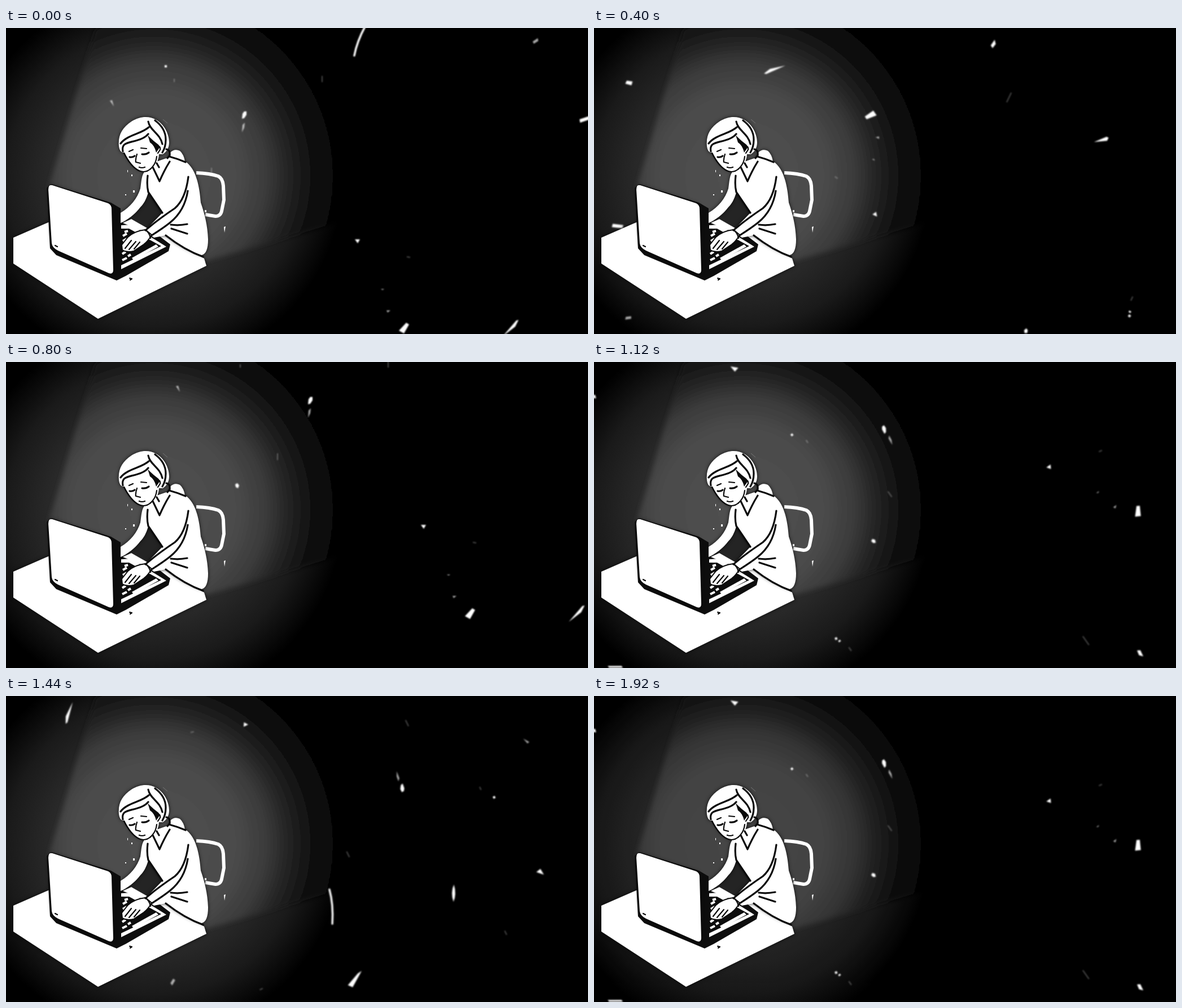
Animation, 1031 px wide and 543 px high, one loop 2000 ms. Source, as an HTML page:

```html
<!DOCTYPE html>
<html lang="en">
<head>
<meta charset="utf-8">
<title>Late at the laptop</title>
<style>
  html, body { margin: 0; width: 100%; height: 100%; overflow: hidden; background: #000; }
  svg { display: block; width: 100%; height: 100%; }
  .shadow { filter: drop-shadow(0 0 3px #000c); }
  .ink { fill: none; stroke: #0a0a0a; stroke-width: 3.2; stroke-linecap: round; stroke-linejoin: round; }
  .thin { stroke-width: 2.2; }
</style>
</head>
<body>
<svg viewBox="0 0 1031 543" preserveAspectRatio="none">
  <defs>
    <radialGradient id="dim" gradientUnits="userSpaceOnUse" cx="262" cy="268" r="335">
      <stop offset="0" stop-color="#323232"/>
      <stop offset=".55" stop-color="#292929"/>
      <stop offset=".78" stop-color="#1a1a1a"/>
      <stop offset="1" stop-color="#000"/>
    </radialGradient>
    <radialGradient id="lit" gradientUnits="userSpaceOnUse" cx="262" cy="262" r="342">
      <stop offset="0" stop-color="#505050"/>
      <stop offset=".42" stop-color="#4b4b4b"/>
      <stop offset=".58" stop-color="#3b3b3b"/>
      <stop offset=".7" stop-color="#232323"/>
      <stop offset=".82" stop-color="#101010"/>
      <stop offset="1" stop-color="#000"/>
    </radialGradient>
    <filter id="soft"><feGaussianBlur stdDeviation="4"/></filter>
    <filter id="grainy"><feGaussianBlur stdDeviation=".8"/></filter>
  </defs>

  <rect width="1031" height="543"/>
  <g id="glow">
    <rect width="620" height="543" fill="url(#dim)"/>
    <path d="M162-10L75 285 200 440 345 416 612 338V-10z" fill="url(#lit)" filter="url(#soft)"/>
  </g>

  <g id="dust" fill="#fff" filter="url(#grainy)">
    <!-- bright flakes -->
    <path d="M418 161l1-9 3-4 4 0 0 6-4 6zM714 526L705 542 696 537 709 523zM880 547L904 519l4-1-6 12z
      M618 375l9 0-4 7zM1016 162l18-6 1 6-18 6zM281 66h4v4h-4zM289 303l4-2 3 4-2 5-4-2z
      M1111 398l11-2 0 6-10 3zM562 733l5 3-2 12-5-6zM328 660l-16 18-4 0 0-6z
      M137 406l4 1-1 4-4-1zM139 414l4 0 0 3-4 0zM264-94l10 10-9 2zM34-194l5 3-2 6-4-3z
      M-220 215l20 14 0 4-20-14zM415-40Q418-58 429-67 427-50 415-40zM662-118L637-107l-8 1 27-19z"/>
    <path d="M617 49Q622 22 639-8" fill="none" stroke="#fff" stroke-width="3.5" stroke-linecap="round"/>
    <!-- mid-tone flakes -->
    <path opacity=".65" d="M418 185l1-13 4-4-1 9zM674 501l7 0-5 4zM664 463l6 0-3 2z
      M933 24l9-6 1 5-8 5zM184 129l4-1 3 11z"/>
    <!-- barely visible threads -->
    <path opacity=".28" fill="none" stroke="#fff" stroke-width="2"
      d="M298 90v6M560 85v11M710 406l6 1M364 248v12M498 657v19M148 434v8M370-161v8M800-57h6"/>
  </g>

  <!-- chair and desk -->
  <path d="M337 257Q362 258 376 263 384 267 385 280L386 305 382 325Q380 334 371 334L353 331"
    fill="none" stroke="#fff" stroke-width="6"/>
  <path class="shadow" fill="#fff" d="M13 372L70 347 110 330 205 345 285 369 351 409 355 422 163 516 13 418z"/>
  <path fill="#fff" d="M386 353l3-1-2 11z"/>

  <!-- laptop body and keyboard -->
  <path fill="#0d0d0d" d="M72 284L78 391 89 403 196 448 212 440 288 396 291 384 240 345H203V320L186 310 80 277z"/>
  <path fill="#fff" d="M204 350L222 349 284 388 204 428z"/>
  <path fill="#0d0d0d" d="M204 356L218 356 275 387 204 421z"/>
  <path fill="#fff" d="M223 408L266 384 270 388 226 412z"/>
  <path d="M207 369l7-4M207 378l7-4M206 401l6-4M206 412l8-4M216 405l5-3M210 362l6-2"
    stroke="#fff" stroke-width="4"/>
  <path class="shadow" fill="#fff"
    d="M82 279L181 311Q187 314 187 321L190 429Q190 438 182 435L92 395Q82 390 81 382L75 287Q75 277 82 279z"/>
  <path d="M87 386l4 2M219 444l4 1-3 2" class="ink thin"/>

  <!-- figure -->
  <path fill="#242424" d="M252 288L280 328 248 356 212 342z"/>
  <g class="shadow" fill="#fff">
    <path d="M290 222Q298 213 308 218 315 224 317 237L288 233z"/>
    <path d="M264 238L290 229 318 237C337 250 343 282 345 310 352 330 357 350 358 375 358 392 354 402 346 403
      325 395 305 385 283 368L262 372 246 360 277 328 252 292C248 305 244 312 238 318 228 331 215 341 203 346
      L203 328C220 318 233 302 238 285 240 270 240 262 246 254z"/>
    <path d="M200 210C198 190 206 177 222 166 238 156 254 156 266 163 281 171 289 189 289 203 289 213 284 220 278 224
      L271 224C270 240 260 254 246 255 232 254 220 241 210 221 204 222 201 217 200 210z"/>
  </g>
  <path fill="#fff" d="M207 346L222 339 250 355 244 361z"/>
  <path fill="#fff" stroke="#0a0a0a" stroke-width="2"
    d="M247 358L258 367Q252 378 244 384L226 396Q214 399 206 394L205 385 216 371Q228 360 247 358z"/>
  <path class="ink thin" d="M211 391l11-14M218 393l12-14M227 392l10-12M246 358Q254 362 256 373"/>

  <!-- hair and face -->
  <path class="ink" d="M203 205C214 190 240 188 253 176M252 166C255 182 273 187 277 206
    M207 219C204 204 216 204 230 200 242 197 248 193 252 188M264 164Q283 178 283 198 283 211 277 221
    M284 215Q291 216 290 226L286 231"/>
  <path fill="#0a0a0a" d="M251 190Q259 199 270 207L273 211 266 221Q263 208 255 203z"/>
  <path class="ink thin" d="M267 213Q274 207 273 216L269 222M209 222Q221 246 235 253 249 259 259 247 266 239 267 228
    M218 219l7-3M239 213l10 1M232 224Q229 233 230 238L238 240M236 247Q241 249 246 247"/>
  <path class="ink" d="M219 229Q224 230 228 227M241 224Q248 225 253 221"/>

  <!-- clothes -->
  <path class="ink" d="M260 247L272 272Q280 253 290 237M267 240l4 7M289 228Q304 232 318 238
    M323 264C320 288 313 308 299 320 281 332 262 346 247 359M322 289C318 315 307 332 291 345 280 354 269 361 258 368
    M251 262Q249 279 252 291L277 328M292 349Q306 351 321 348M293 356L321 365M283 368Q316 394 349 406"/>

  <!-- stray specks -->
  <path fill="#fff" d="M225 288h3v4h-3zM222 260h2v3h-2zM215 252h1v4h-1zM211 295h2v2h-2zM352 323h3v4h-3z"/>
  <path d="M278 162l8 7" stroke="#777"/>
</svg>
<script>
const FRAME = 80, LOOP = 2000;
const DUST_CYCLE = 10.6;            // length of the dust flicker, in frames
const PIVOT = [421, 154];
// Each pose turns the one sheet of dust and moves its pivot: [degrees, x, y]
const POSES = [
  [0, 421, 154], [118, 640, 190], [-72, 430, 395], [-35.2, 513, 120],
  [171, 598, 372], [-154.5, 584, 619], [62, 548, 140], [154, 703, 163],
  [-104, 405, 350], [27, 470, 88], [0, 538, 68]
];
const dust = document.getElementById("dust");
const glow = document.getElementById("glow");

function draw(now) {
  const frame = Math.floor((now % LOOP) / FRAME);
  const [angle, x, y] = POSES[Math.round(frame % DUST_CYCLE)];
  dust.setAttribute("transform",
    `translate(${x} ${y}) rotate(${angle}) translate(${-PIVOT[0]} ${-PIVOT[1]})`);
  glow.setAttribute("opacity", 1 - Math.max(0, frame - 21) * 0.035);
}

const start = performance.now();
function tick() {
  draw(performance.now() - start);
  requestAnimationFrame(tick);
}
tick();
</script>
</body>
</html>
```
